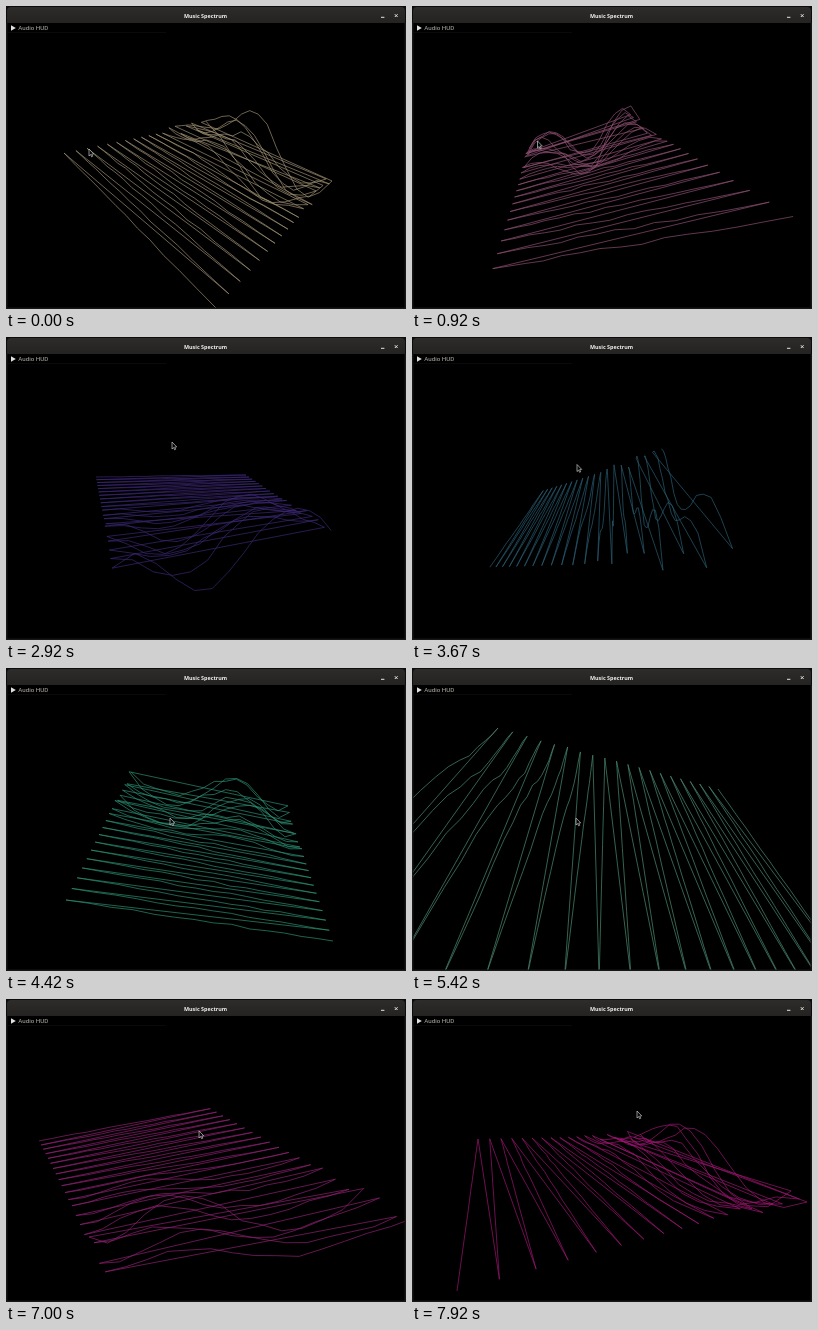
Write an HTML page with a canvas that moves like this. It is 400 px wide and 303 px high and loops after 8 s.

```html
<!DOCTYPE html>
<html lang="en">
<head>
<meta charset="utf-8">
<title>Music Spectrum</title>
<style>
  html, body { margin: 0; width: 100%; height: 100%; overflow: hidden; background: #000; }
  canvas { display: block; width: 400px; height: 303px; }
</style>
</head>
<body>
<canvas id="stage"></canvas>
<script>
const FPS = 12, STEPS = 96, ROWS = 20, BINS = 14;
const canvas = document.getElementById('stage');
const ctx = canvas.getContext('2d');
const ratio = window.devicePixelRatio || 1;
canvas.width = 400 * ratio;
canvas.height = 303 * ratio;

// Camera key poses: sheet corners (u,v) = 00, 10, 11, 01 as the view swoops around.
const poses = [
  { step: 0, at: [58, 147, 210, 302, 326, 175, 200, 118] },
  { step: 22, at: [318, 196, 225, 118, 80, 139, 180, 262] },
  { step: 35, at: [240, 138, 90, 140, 106, 228, 325, 195] },
  { step: 53, at: [60, 232, 327, 273, 282, 143, 125, 103] },
  { step: 65, at: [444, 315, 306, 121, 86, 61, -200, 307] },
  { step: 74, at: [310, 158, 160, 87, 0, 170, 290, 322] },
  { step: 95, at: [66, 140, 45, 292, 395, 195, 228, 137] }
];
const cursorPath = [
  { step: 0, at: [83, 143] },
  { step: 22, at: [168, 127] },
  { step: 35, at: [166, 105] },
  { step: 53, at: [164, 150] },
  { step: 74, at: [164, 150] },
  { step: 95, at: [225, 112] }
];

const TAU = 2 * Math.PI;
const mix = (a, b, k) => a + (b - a) * k;
const wave = (t, peak, period) => Math.cos(TAU * (t - peak) / period);
const random = (i, j) => {
  const n = Math.sin(i * 127.1 + j * 311.7) * 43758.5453;
  return n - Math.floor(n);
};
const smooth = (a, b, n) => {
  const k = Math.min(1, Math.max(0, (n - a) / (b - a)));
  return k * k * (3 - 2 * k);
};

function follow(path, step) {
  const i = Math.max(1, path.findIndex(key => key.step >= step));
  const a = path[i - 1], b = path[i];
  const k = (step - a.step) / (b.step - a.step);
  return a.at.map((n, j) => mix(n, b.at[j], k));
}

// Corners of a square sheet turning steadily under a tilted perspective camera.
function orbit(step) {
  const yaw = (60 - 7.42 * step) * Math.PI / 180;
  const c = Math.cos(yaw), s = Math.sin(yaw);
  return [[-1, -1], [1, -1], [1, 1], [-1, 1]].flatMap(([u, v]) => {
    const x = u * c + v * s, near = u * s - v * c;
    const scale = 105 / (1 - 0.28 * near);
    return [205 + x * scale, 180 + near * 0.5 * scale];
  });
}

// The swoop is how far the view departs from the steady orbit.
const swoop = poses.map(({ step, at }) => {
  const steady = orbit(step);
  return { step, at: at.map((n, i) => n - steady[i]) };
});

function sheetAt(step) {
  const shift = follow(swoop, step);
  return orbit(step).map((n, i) => n + shift[i]);
}

// Perspective map from the unit square to the quad, with w as depth.
function projector([ax, ay, bx, by, cx, cy, dx, dy]) {
  const sx = ax - bx + cx - dx, sy = ay - by + cy - dy;
  const px = bx - cx, py = by - cy, qx = dx - cx, qy = dy - cy;
  const den = px * qy - py * qx;
  const g = (sx * qy - sy * qx) / den, h = (px * sy - py * sx) / den;
  return (u, v) => {
    const w = Math.max(0.15, 1 + g * u + h * v);
    return {
      x: (ax + (bx * (1 + g) - ax) * u + (dx * (1 + h) - ax) * v) / w,
      y: (ay + (by * (1 + g) - ay) * u + (dy * (1 + h) - ay) * v) / w,
      w
    };
  };
}

// Each channel swings at its own pace.
function colorAt(step) {
  const t = step / FPS;
  const red = 98 + 58 * wave(t, 0, 7.9);
  const green = 85 + 68 * wave(t, 4.9, 5.4);
  return `rgb(${Math.round(red)}, ${Math.round(green)}, 113)`;
}

// Recent rows carry a swell that rolls along the spectrum; older rows lie flat.
function heightAt(u, v, id, step) {
  const loud = smooth(0.42, 0.85, v);
  const music = 1 - 0.85 * Math.exp(-(((step - 69) / 11) ** 2));
  const phase = TAU * step / 32 + 1.2 * (random(id, 1) - 0.5);
  const swell = Math.sin(TAU * u ** 1.5 + phase) * Math.sqrt(Math.sin(Math.PI * u));
  const gain = 32 * (0.4 + 0.8 * random(id, 2));
  const tips = 14 * (random(id, u < 0.5 ? 3 : 4) - 0.4) * Math.abs(2 * u - 1) ** 3;
  const ripple = (random(id, u * BINS + 10) - 0.5) * Math.sin(Math.PI * u);
  return loud * music * (gain * swell + tips) + ripple * (1.5 + 4 * loud);
}

function drawSpectrum(step) {
  const project = projector(sheetAt(step));
  const reference = project(0.5, 0.9).w;
  ctx.beginPath();
  // One strip: the end of every row joins the start of the next.
  for (let row = ROWS - 1; row >= 0; row--) {
    const v = row / (ROWS - 1);
    for (let bin = 0; bin <= BINS; bin++) {
      const u = bin / BINS, p = project(u, v);
      ctx.lineTo(p.x, p.y - heightAt(u, v, row + step, step) * reference / p.w);
    }
  }
  ctx.strokeStyle = colorAt(step);
  ctx.lineWidth = 0.7;
  ctx.lineJoin = 'bevel';
  ctx.stroke();
}

function shape(points, x = 0, y = 0) {
  ctx.beginPath();
  points.forEach(([px, py]) => ctx.lineTo(x + px, y + py));
  ctx.closePath();
}

function line(x1, y1, x2, y2) {
  ctx.beginPath();
  ctx.moveTo(x1, y1);
  ctx.lineTo(x2, y2);
  ctx.stroke();
}

function drawWindow() {
  ctx.fillStyle = '#171717';
  ctx.fillRect(0, 0, 1.5, 303);
  ctx.fillRect(398.5, 0, 1.5, 303);
  ctx.fillRect(0, 301.5, 400, 1.5);
  const bar = ctx.createLinearGradient(0, 1, 0, 17);
  bar.addColorStop(0, '#2e2c2a');
  bar.addColorStop(1, '#242321');
  ctx.fillStyle = '#0c0c0c';
  ctx.fillRect(0, 0, 400, 17);
  ctx.fillStyle = bar;
  ctx.beginPath();
  ctx.roundRect(1, 1, 398, 16, [4, 4, 0, 0]);
  ctx.fill();

  ctx.fillStyle = '#f2f2f0';
  ctx.textAlign = 'center';
  ctx.font = 'bold 5.4px "Noto Sans", sans-serif';
  ctx.fillText('Music Spectrum', 199.5, 11.8);
  ctx.strokeStyle = '#e4e4e2';
  ctx.lineWidth = 1;
  line(375, 11.3, 378.4, 11.3);
  line(388.8, 8.2, 391.6, 11);
  line(391.6, 8.2, 388.8, 11);

  ctx.fillStyle = '#b8b5ac';
  ctx.textAlign = 'left';
  ctx.font = '6.2px Roboto, sans-serif';
  ctx.fillText('Audio HUD', 12.3, 24.2);
  ctx.fillStyle = '#e0e0e0';
  shape([[5, 19.3], [9.8, 22], [5, 24.7]]);
  ctx.fill();
  ctx.strokeStyle = '#0a0a0a';
  line(2, 26.5, 160, 26.5);
}

function drawCursor([x, y]) {
  shape([[0, 0], [0, 7], [1.6, 5.6], [2.6, 7.8], [3.7, 7.3], [2.7, 5.1], [4.7, 4.9]], x, y);
  ctx.fillStyle = '#050505';
  ctx.fill();
  ctx.strokeStyle = '#c8c8c8';
  ctx.lineWidth = 0.7;
  ctx.stroke();
}

const start = performance.now();
function draw(now) {
  const elapsed = Math.max(0, now - start);
  const step = Math.floor(elapsed * FPS / 1000 + 0.08) % STEPS;
  ctx.setTransform(ratio, 0, 0, ratio, 0, 0);
  ctx.fillStyle = '#000';
  ctx.fillRect(0, 0, 400, 303);
  drawSpectrum(step);
  drawWindow();
  drawCursor(follow(cursorPath, step));
  requestAnimationFrame(draw);
}
draw(start);
</script>
</body>
</html>
```
